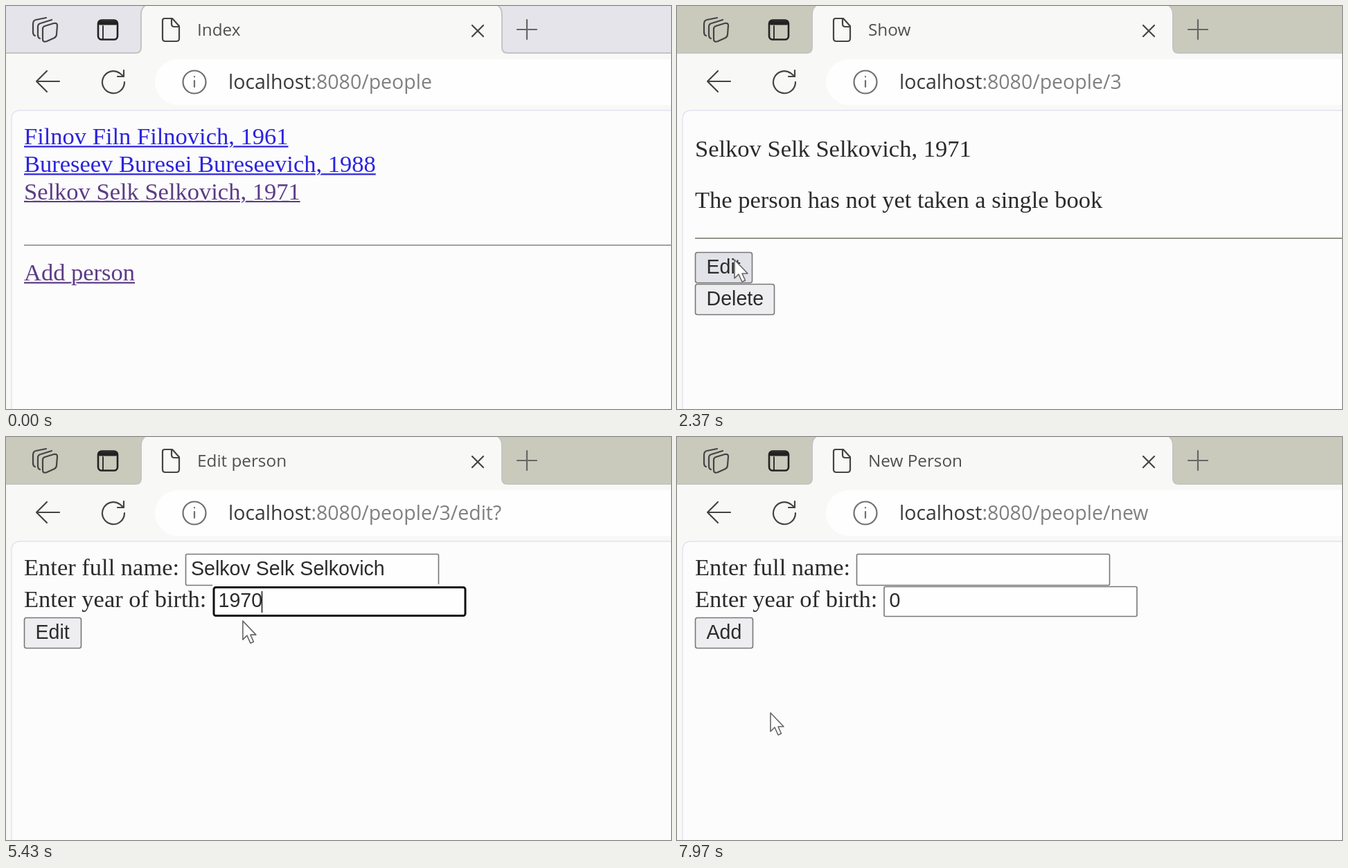
Recreate the animation shown at these times as an HTML page. Size 960x583 px, loop 8 s.

```html
<!DOCTYPE html>
<html lang="en">
<head>
<meta charset="utf-8">
<title>People</title>
<style>
html, body { margin: 0; width: 100%; height: 100%; overflow: hidden; background: #f8f8f6; }
svg { display: block; width: 100vw; height: 100vh; }
text { white-space: pre; }
.serif { font: 34.5px "Liberation Serif", serif; fill: #2b2b2b; }
.sans { font: 28.6px "Liberation Sans", sans-serif; fill: #2b2b2b; }
.title { font: 24.3px "Open Sans", sans-serif; fill: #505050; }
.url { font: 28.5px "Open Sans", sans-serif; fill: #808080; }
.link { paint-order: stroke; stroke: #fcfcfd; stroke-width: 4px; }
.icon { fill: none; stroke: #444; stroke-width: 2.2; stroke-linecap: round; stroke-linejoin: round; }
</style>
</head>
<body>
<svg id="stage" viewBox="0 0 960 583" preserveAspectRatio="none">
  <rect width="960" height="583" fill="#f8f8f6"/>
  <g id="bar" stroke="#c4c4c4" stroke-width="2">
    <path d="M-2-2H203Q195 2 195 12V60Q195 68 187 68H-2Z"/>
    <path d="M962-2H708Q716 2 716 12V60Q716 68 724 68H962Z"/>
  </g>
  <g class="icon">
    <path d="M56 29L69 25Q74 24 74 28L73 41Q73 44 70 46L59 51Q53 53 53 48V33Q53 30 56 29Z"/>
    <path d="M49 47Q46 46 46 42V30Q46 26 50 25L66 20"/>
    <path d="M42 43Q39 42 39 38V26Q39 21 43 20L58 17"/>
    <g stroke="#222">
      <rect x="133" y="20.500" width="28" height="28" rx="5" stroke-width="2.600"/>
      <path d="M136 24.500H158" stroke-width="6"/>
      <path d="M140 29V48" stroke-width="1.800"/>
    </g>
    <path d="M229 18H240L250 29V47Q250 51 246 51H230Q226 51 226 47V21Q226 18 229 18ZM239 18V26Q239 30 243 30H250"/>
    <path d="M673 28L689 44M689 28L673 44"/>
    <path d="M738 34H766M752 20V48" stroke="#666"/>
    <path d="M77 109H44M59 94L44 109L59 124"/>
    <path d="M171 110A16 16 0 1 1 164 97L170 102M170 93V102H161"/>
  </g>
  <rect x="215" y="77" width="780" height="66" rx="33" fill="#fefefe"/>
  <g class="icon" style="stroke:#707070">
    <circle cx="272" cy="110" r="16.500"/>
    <path d="M272 108V117M272 102V102.500"/>
  </g>
  <path d="M8 600V164Q8 151 21 151H980V600Z" fill="#fcfcfd" stroke="#e4e2f1" stroke-width="1.500"/>
  <text id="title" class="title" x="276" y="42.500"></text>
  <text class="url" x="321" y="120"><tspan fill="#3a3a3a">localhost</tspan><tspan id="path"></tspan></text>
  <g id="index"></g>
  <g id="show"></g>
  <g id="edit"></g>
  <g id="new"></g>
  <g id="cursor" stroke-linejoin="round" stroke-width="1.600">
    <path id="arrow" d="M0 0V27L6 21L11 32L15.500 30L11 20H19Z" fill="#fff" stroke="#666"/>
    <path id="hand" d="M-3 3Q-3 0 0 0Q3 0 3 3V13Q4 11 6 12L8 14Q10 12 12 15Q16 14 17 18V27Q17 32 14 35V39H-1V35L-9 23Q-11 20-8 19Q-6 18-3 22ZM3 13V20M8 14V21M12.500 15V21" fill="#fff" stroke="#555"/>
    <path id="beam" d="M-6-14Q0-14 0-10Q0-14 6-14M0-10V11M-6 14Q0 14 0 10Q0 14 6 14" fill="none" stroke="#555"/>
  </g>
</svg>
<script>
const LOOP = 8000;
const $ = id => document.getElementById(id);
const NAME = "Selkov Selk Selkovich";
const BLUE = "#2c24dc", VISITED = "#5c3c84";

function add(parent, tag, attrs, text) {
  const el = document.createElementNS("http://www.w3.org/2000/svg", tag);
  for (const k in attrs) el.setAttribute(k, attrs[k]);
  if (text) el.textContent = text;
  parent.append(el);
  return el;
}
const write = (g, cls, x, y, text) => add(g, "text", { class: cls, x, y }, text);

function link(g, y, text, color) {
  const line = add(g, "path", { stroke: color, "stroke-width": 2.4 });
  const label = write(g, "serif link", 26, y, text);
  label.style.fill = color;
  line.setAttribute("d", `M26 ${y + 3.4}h${label.getComputedTextLength()}`);
  return label;
}
const rule = (g, y, color) => add(g, "path", { d: `M26 ${y}H960`, stroke: color, "stroke-width": 2 });

const buttons = [];
function button(g, y, width, text) {
  const box = add(g, "rect", { x: 26.5, y, width, height: 44, rx: 3, stroke: "#777", "stroke-width": 1.6 });
  write(g, "sans", 42.5, y + 30, text);
  buttons.push({ box, page: g.id, y, width });
}
const field = (g, x, y, height) =>
  add(g, "rect", { x, y, width: 365, height, rx: 2, fill: "#fefefe", stroke: "#777", "stroke-width": 1.6 });

function form(g, name, year, action) {
  write(g, "serif", 26, 200, "Enter full name:");
  write(g, "serif", 26, 246, "Enter year of birth:");
  field(g, 259.5, 169.5, 45);
  write(g, "sans", 267, 200, name);
  const box = field(g, 299, 216.5, 43);
  const ring = add(g, "g", {});
  add(ring, "rect", { x: 298, y: 213, width: 368, height: 48, fill: "#fcfcfd" });
  add(ring, "rect", { x: 300, y: 217.5, width: 363, height: 41, rx: 3, fill: "#fefefe", stroke: "#111", "stroke-width": 3 });
  const mark = add(g, "rect", { x: 354, y: 222, width: 15.5, height: 33, fill: "#2962c5" });
  const value = write(g, "sans", 306.5, 246, year);
  const caret = add(g, "path", { d: "M369.500 223V254", stroke: "#222", "stroke-width": 1.6 });
  button(g, 261.5, action === "Add" ? 83 : 82, action);
  return { box, ring, mark, value, caret };
}

link($("index"), 200, "Filnov Filn Filnovich, 1961", BLUE);
link($("index"), 240, "Bureseev Buresei Bureseevich, 1988", BLUE);
const person = link($("index"), 279.5, NAME + ", 1971", VISITED);
rule($("index"), 346, "#a0a0a8");
link($("index"), 397, "Add person", VISITED);

write($("show"), "serif", 26, 217.5, NAME + ", 1971");
write($("show"), "serif", 26, 291.5, "The person has not yet taken a single book");
rule($("show"), 336, "#94948c");
button($("show"), 356.5, 82, "Edit");
button($("show"), 402.5, 114, "Delete");

const editor = form($("edit"), NAME, "", "Edit");
add(editor.value, "tspan", {}, "197");
const last = add(editor.value, "tspan", {});
const blank = form($("new"), "", "0", "Add");
for (const part of [blank.ring, blank.mark, blank.caret]) part.remove();

// start, page, tab title, path
const PAGES = [
  [0, "index", "Index", ":8080/people"],
  [1850, "show", "Show", ":8080/people/3"],
  [2650, "edit", "Edit person", ":8080/people/3/edit?"],
  [6500, "index", "Index", ":8080/people"],
  [7750, "new", "New Person", ":8080/people/new"]
];
const FOCUS = 3300, TYPED = 5200;

// time, x, y of the pointer
const MOVES = [
  [480, 530, 600], [870, 440, 420], [1250, 365, 273], [1750, 365, 273],
  [2250, 83, 367], [2650, 83, 367], [3200, 415, 245], [3700, 415, 245],
  [3950, 372, 245], [4350, 352, 265], [5350, 352, 265], [6050, 79, 296],
  [6500, 79, 296], [7050, 135, 389], [7720, 135, 389], [7950, 135, 399]
];

function pointer(t) {
  let i = MOVES.findIndex(m => m[0] > t);
  if (i < 0) i = MOVES.length;
  const a = MOVES[Math.max(0, i - 1)], b = MOVES[Math.min(i, MOVES.length - 1)];
  const p = b[0] > a[0] ? Math.max(0, (t - a[0]) / (b[0] - a[0])) : 0;
  const e = p * p * (3 - 2 * p);
  return [a[1] + (b[1] - a[1]) * e, a[2] + (b[2] - a[2]) * e];
}

function shape(page, x, y) {
  if (page === "index") {
    if (y > 170 && y < 286 && x < 425 || y > 370 && y < 405 && x < 187) return "hand";
  }
  if (page === "edit") {
    if (y > 169 && y < 215 && x > 259 && x < 624 || y > 216 && y < 260 && x > 299 && x < 664) return "beam";
  }
  return "arrow";
}

const visible = (el, on) => el.setAttribute("visibility", on ? "inherit" : "hidden");

function draw(t) {
  const [, page, title, path] = PAGES.filter(p => p[0] <= t).pop();
  for (const id of ["index", "show", "edit", "new"]) visible($(id), id === page);
  $("title").textContent = title;
  $("path").textContent = path;
  $("bar").setAttribute("fill", t < PAGES[1][0] ? "#e4e4ea" : "#c9cabc");
  person.textContent = `${NAME}, ${t < TYPED ? 1971 : 1970}`;

  const [x, y] = pointer(t);
  $("cursor").setAttribute("transform", `translate(${x} ${y})`);
  const kind = shape(page, x, y);
  for (const id of ["arrow", "hand", "beam"]) visible($(id), id === kind);
  for (const b of buttons) {
    const over = b.page === page && x > 26 && x < 26 + b.width && y > b.y && y < b.y + 44;
    b.box.setAttribute("fill", over ? "#e2e2e9" : "#eeeef1");
  }

  const typed = t >= TYPED, focused = t >= FOCUS;
  const selected = t > 3950 && x < 362 && !typed;
  const blink = (t - (typed ? TYPED : FOCUS)) % 1000 < 500;
  visible(editor.box, !focused);
  visible(editor.ring, focused);
  visible(editor.mark, selected);
  visible(editor.caret, focused && !selected && blink);
  last.textContent = typed ? "0" : "1";
  last.setAttribute("style", selected ? "fill:#fff" : "");
}

const start = performance.now();
function tick() {
  draw((performance.now() - start) % LOOP);
  requestAnimationFrame(tick);
}
tick();
</script>
</body>
</html>
```
